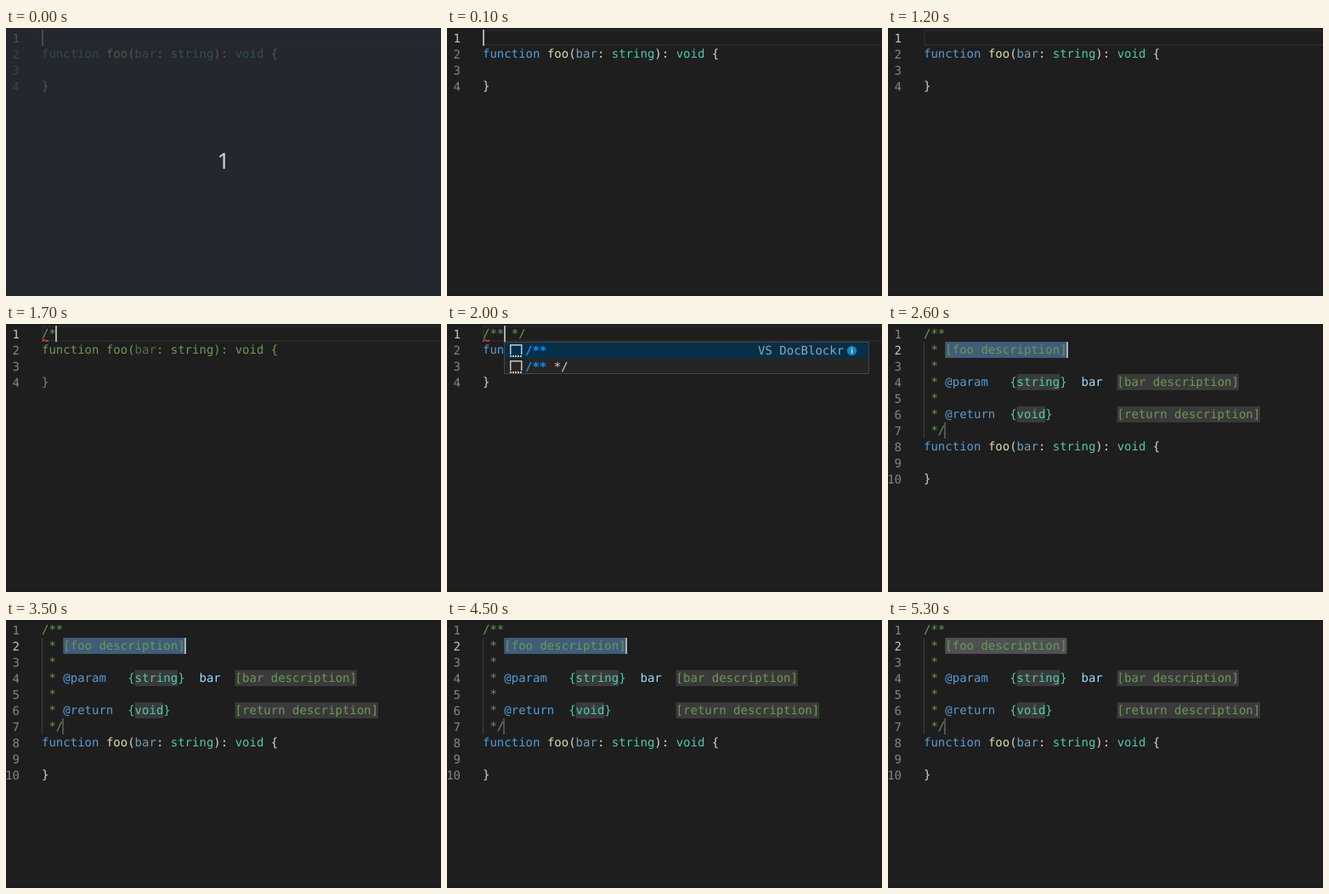
An HTML page that plays this animation: 512 by 316 pixels, repeating every 5.4 s.

```html
<!DOCTYPE html>
<html lang="en">
<head>
<meta charset="utf-8">
<title>Doc comment completion</title>
<style>
  html, body { margin: 0; width: 100%; height: 100%; overflow: hidden; background: #1e1e1e; }
  svg { display: block; width: 512px; height: 316px; }
  text {
    font: 14px "DejaVu Sans Mono", monospace;
    white-space: pre;
    text-rendering: geometricPrecision;
    fill: #d4d4d4;
  }
  .num { fill: #858585; text-anchor: end; }
  .on { fill: #c6c6c6; }
  .key { fill: #569cd6; }
  .fn { fill: #dcdcaa; }
  .type { fill: #4ec9b0; }
  .var { fill: #9cdcfe; }
  .doc { fill: #6a9955; }
  .dim { fill-opacity: .667; }
  .hit { fill: #0097fb; font-weight: bold; }
  .info { fill: #d4d4d4; opacity: .7; }
  .count { font: 26px "Noto Sans", "Open Sans", sans-serif; fill: #d6d3cb; text-anchor: middle; }
</style>
</head>
<body>
<svg id="stage" viewBox="0 0 512 316"></svg>
<script>
const LOOP = 5400, LEFT = 42, TOP = 2, ROW = 19, CHAR = 8.428;
const stage = document.getElementById('stage');

const colX = col => LEFT + col * CHAR;
const rowY = row => TOP + row * ROW;

const rect = (x, y, w, h, fill, more = '') =>
  `<rect x="${x}" y="${y}" width="${w}" height="${h}" fill="${fill}" ${more}/>`;

// A run is [text, class]; a line is a list of runs.
const text = (x, y, runs) => `<text x="${x}" y="${y}">` +
  runs.map(([s, c = '']) => `<tspan class="${c}">${s}</tspan>`).join('') + '</text>';

const signature = [
  ['function', 'key'], [' '], ['foo', 'fn'], ['('], ['bar', 'var dim'], [': '],
  ['string', 'type'], ['): '], ['void', 'type'], [' {']
];
const body = [signature, [], [['}']]];
const commented = body.map(line => line.map(([s, c = '']) =>
  [s, c.includes('dim') ? 'doc dim' : 'doc']));

const docBlock = [
  [['/**', 'doc']],
  [[' * [foo description]', 'doc']],
  [[' *', 'doc']],
  [[' * ', 'doc'], ['@param', 'key'], ['   '], ['{string}', 'type'], ['  '], ['bar', 'var'],
   ['  [bar description]', 'doc']],
  [[' *', 'doc']],
  [[' * ', 'doc'], ['@return', 'key'], ['  '], ['{void}', 'type'],
   ['         [return description]', 'doc']],
  [[' */', 'doc']],
  ...body
];

const first = (s, cls) => [s ? [[s, cls]] : [], ...body];
const blank = first('');
const slash = first('/');
const opened = [[['/*', 'doc']], ...commented];
const closed = first('/** */', 'doc');

// cursor: [row, col], or nothing while it is blinked off
const caret = (row, col) => ({ cursor: [row, col] });
const filled = { lines: docBlock, active: 1, snippet: '#264f78' };
const filledOn = { ...filled, ...caret(1, 20) };

const steps = [
  [0, { lines: blank, ...caret(0, 0), count: 1 }],
  [100, { lines: blank, ...caret(0, 0) }],
  [200, { lines: blank }],
  [700, { lines: blank, ...caret(0, 0) }],
  [1200, { lines: blank }],
  [1300, { lines: slash, ...caret(0, 1) }],
  [1600, { lines: opened, ...caret(0, 2) }],
  [1700, { lines: opened, ...caret(0, 2), error: true }],
  [2000, { lines: closed, ...caret(0, 3), error: true, popup: true }],
  [2300, { lines: closed, ...caret(0, 3), popup: true }],
  [2400, { lines: closed, popup: true }],
  [2600, filledOn],
  [3000, filled],
  [3500, filledOn],
  [4000, filled],
  [4500, filledOn],
  [5000, filled],
  [5300, { ...filled, snippet: '#3a3d41' }]
];

function placeholders(selection) {
  const field = (row, col, len) => rect(colX(col), rowY(row), len * CHAR, ROW,
    '#7c7c7c', 'fill-opacity=".3" rx="1"');
  return rect(LEFT, rowY(1), 1, 6 * ROW, '#404040') +
    rect(colX(3), rowY(1), 17 * CHAR, ROW, selection, 'rx="1"') +
    field(1, 3, 17) + field(3, 13, 6) + field(3, 27, 17) +
    field(5, 13, 4) + field(5, 27, 20) +
    rect(66, rowY(6), 2, ROW, '#525252');
}

function snippetIcon(y) {
  return `<g fill="none" stroke="#c5c5c5"><path stroke-width="1.5" d="M74.75 ${y + 12}V${y + 0.75}H87.75V${y + 12}"/>` +
    `<path stroke-width="2" stroke-dasharray="2 1" d="M74 ${y + 14}H89"/></g>`;
}

function popup() {
  return rect(67.5, 21.5, 429, 37, '#252526', 'stroke="#454545"') +
    rect(68, 22, 428, 18, '#062f4a') +
    snippetIcon(24) + snippetIcon(43) +
    text(92, 36, [['/**', 'hit']]) +
    text(92, 55, [['/**', 'hit'], [' */']]) +
    '<text class="info" x="366" y="36">VS DocBlockr</text>' +
    '<circle cx="476.5" cy="31.5" r="5.7" fill="#1b80b2"/>' +
    rect(475.8, 28.2, 1.5, 1.5, '#d8e6ee') + rect(475.8, 30.6, 1.5, 4, '#d8e6ee');
}

function editor(s) {
  const active = s.active || 0;
  let out = rect(0, 0, 512, 316, '#1e1e1e') + rect(0, 0, 512, 1, '#191919') +
    rect(0, 314, 512, 2, '#1f191f');
  if (!s.snippet) out += rect(43, 3, 480, 17, 'none', 'stroke="#282828" stroke-width="2"');
  if (s.snippet) out += placeholders(s.snippet);
  s.lines.forEach((line, i) => {
    out += `<text class="num${i === active ? ' on' : ''}" x="16" y="${rowY(i) + 15}">${i + 1}</text>`;
    out += text(LEFT, rowY(i) + 14, line);
  });
  if (s.error) out += '<path d="M42 20.5L45 18.5L48 20.5L50 19" fill="none" stroke="#ea4646" stroke-width="1.2"/>';
  if (s.cursor) out += rect(Math.floor(colX(s.cursor[1])), rowY(s.cursor[0]), 2, ROW, '#aeafad');
  if (s.popup) out += popup();
  if (s.count) out += rect(0, 0, 512, 316, '#262a32', 'fill-opacity=".75"') +
    `<text class="count" x="256" y="166">${s.count}</text>`;
  return out;
}

const start = performance.now();
let shown = -1;

function tick(now) {
  const t = Math.max(0, now - start) % LOOP;
  let i = steps.length - 1;
  while (steps[i][0] > t) i--;
  if (i !== shown) {
    stage.innerHTML = editor(steps[i][1]);
    shown = i;
  }
  requestAnimationFrame(tick);
}
tick(start);
</script>
</body>
</html>
```
